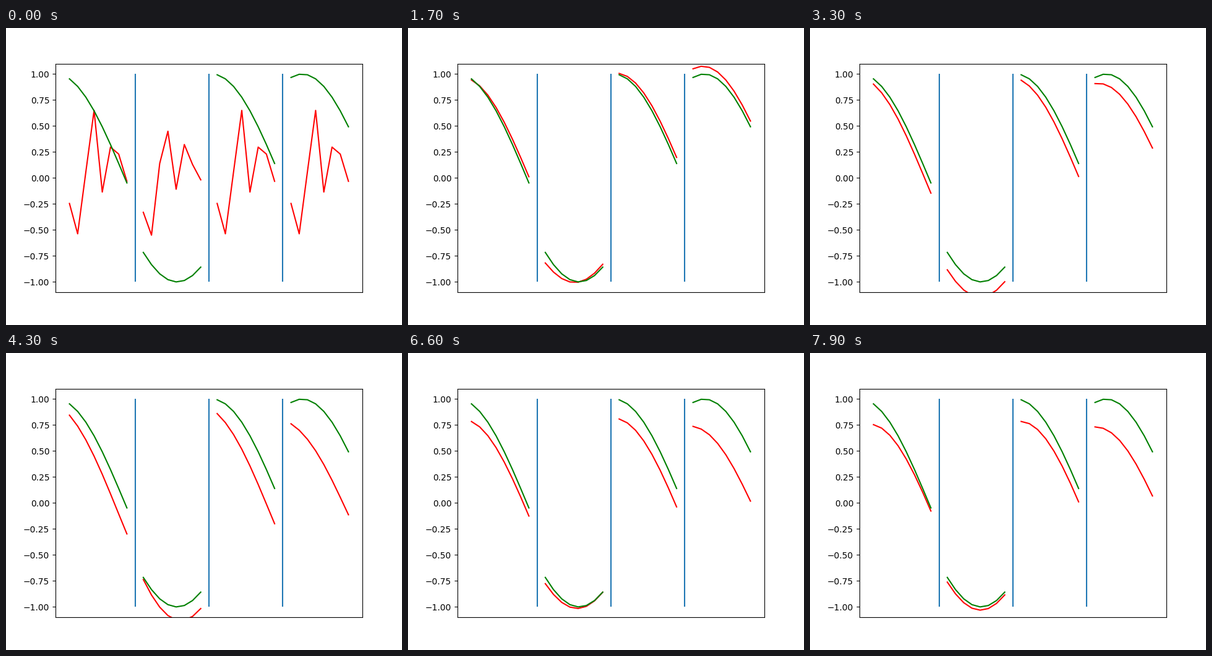
Animation of 640x480 px, one loop 8 s. Source, as a matplotlib script:

```python
import numpy as np
import matplotlib.pyplot as plt
from matplotlib.animation import FuncAnimation

FRAMES, STEP_MS = 80, 100
LOOP = FRAMES * STEP_MS
N = 8
k = np.arange(N)
STARTS = (10, 21, 9, 7)   # first sample of each sequence on the sine wave
WAVE = np.array([np.sin(0.1876 * (s + k)) for s in STARTS])

# Untrained output for the upper sequences and for the lower one
RAW = np.array([-.245, -.537, .06, .65, -.135, .297, .23, -.032])
RAW_LOW = np.array([-.33, -.55, .14, .45, -.108, .322, .13, -.018])

# Time, then the error at the start and end of sequences 1, 2 and 4
STAGES = [
    (1100, (0, .1), (.08, .17), (.115, -.01)),
    (2400, (-.06, -.024), (-.03, .145), (.01, .094)),
    (4300, (-.109, -.25), (-.02, -.158), (-.205, -.606)),
    (5500, (-.135, -.11), (-.085, -.02), (-.215, -.5)),
    (6600, (-.17, -.078), (-.06, -.001), (-.23, -.475)),
    (7900, (-.2, -.03), (-.045, -.027), (-.235, -.425)),
]


def join(parts):
    """Chain the sequences with a one-sample gap after each."""
    return np.concatenate([np.append(p, np.nan) for p in parts])[:-1]


def settle(start, end):
    """Error that eases from start to end along a sequence."""
    return end + (start - end) * (1 - k / (N - 1)) ** 1.7


def fitted(first, low, last):
    first, low, last = settle(*first), settle(*low), settle(*last)
    third = 0.75 * first + 0.25 * last
    return WAVE + np.array([first, low, third, last])


TIMES = [0] + [s[0] for s in STAGES]
CURVES = [np.array([RAW, RAW_LOW, RAW, RAW])] + [fitted(*s[1:]) for s in STAGES]


def predict(t):
    i = min(np.searchsorted(TIMES, t, side="right") - 1, len(STAGES) - 1)
    u = (t - TIMES[i]) / (TIMES[i + 1] - TIMES[i])
    swing = np.sin(np.pi * u)
    if i == 0:
        u = 1 - (1 - min(t / 700, 1)) ** 2   # fast first fit
    p = t / LOOP
    up, low = 0.08 * p * swing, -p * (1 - p) ** 2 * swing
    shift = np.array([[up], [low], [up], [up]])
    return join((1 - u) * CURVES[i] + u * CURVES[i + 1] + shift)


fig, ax = plt.subplots(figsize=(6.4, 4.8), dpi=100)
x = np.arange(4 * (N + 1) - 1)
pred, = ax.plot(x, predict(0), "r")
ax.plot(x, join(WAVE), "g")
ax.vlines([8, 17, 26], -1, 1, color="C0")
ax.set_xlim(-1.7, 35.7)
ax.set_ylim(-1.1, 1.1)
ax.set_xticks([])


def update(frame):
    pred.set_ydata(predict(frame * STEP_MS))
    return pred,


anim = FuncAnimation(fig, update, frames=FRAMES, interval=STEP_MS,
                     repeat=True, repeat_delay=0)
plt.show()
```
